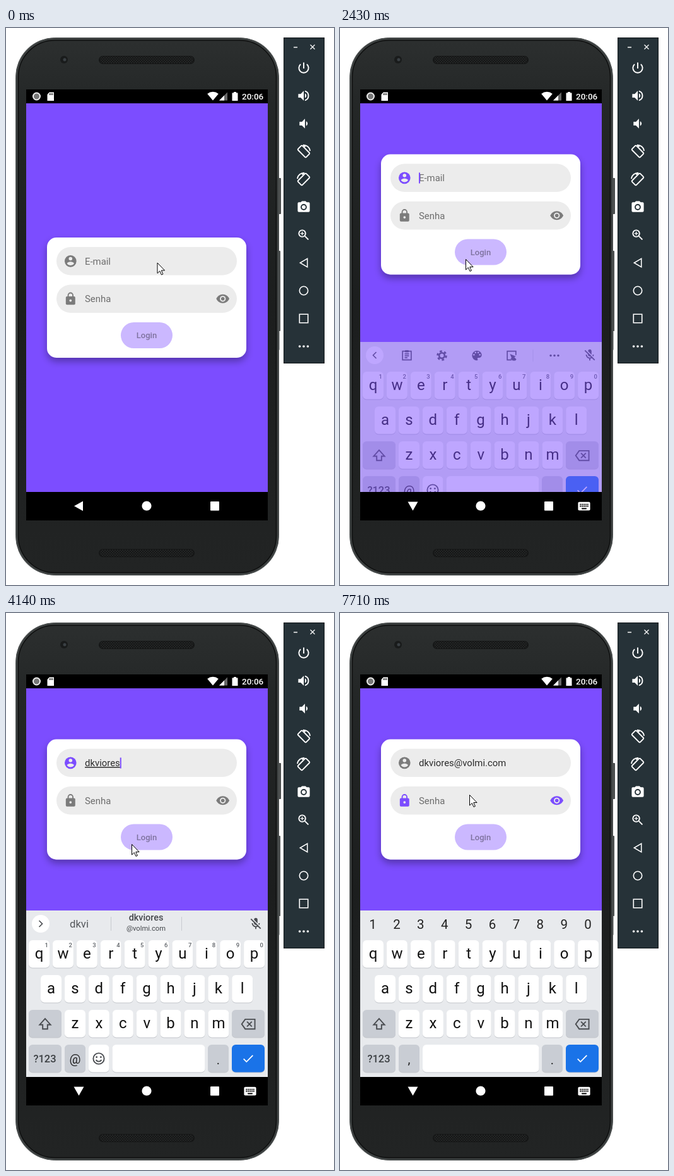
Write an HTML page that moves like this. It is 520 px wide and 880 px high and loops after 8000 ms.

```html
<!DOCTYPE html>
<html lang="pt">
<head>
<meta charset="utf-8">
<title>Login</title>
<style>
  html, body { margin: 0; width: 520px; height: 880px; overflow: hidden; background: #fff; }
  svg { display: block; }
  text { font-family: Roboto, sans-serif; white-space: pre; }
  .mid { text-anchor: middle; }
  .line { fill: none; stroke: currentColor; stroke-width: 2; }
  .icon { fill: currentColor; }
</style>
</head>
<body>
<svg id="stage" width="520" height="880" viewBox="0 0 520 880"></svg>
<script>
const USER = 'dkviores', HOST = '@volmi.com';
const LOOP = 8000, STEP = 1000 / 7;
const PURPLE = '#7c4dff', GRAY = '#7b7b7b', FIELD = '#ececec';

const rect = (x, y, w, h, r, fill, more = '') =>
  `<rect x="${x}" y="${y}" width="${w}" height="${h}" rx="${r}" fill="${fill}" ${more}/>`;
const circle = (x, y, r, more = '') => `<circle cx="${x}" cy="${y}" r="${r}" ${more}/>`;
const shape = (d, more = '') => `<path d="${d}" ${more}/>`;
const line = (d, more = '') => shape(d, `class="line" ${more}`);
const label = (x, y, size, str, fill, more = '') =>
  `<text x="${x}" y="${y}" font-size="${size}" fill="${fill}" ${more}>${str}</text>`;
const mid = (x, y, size, str, fill, more = '') => label(x, y, size, str, fill, `class="mid" ${more}`);
const icon = (x, y, size, color, body, id = '') =>
  `<g ${id && `id="${id}"`} class="icon" color="${color}" transform="translate(${x - size / 2} ${y - size / 2}) scale(${size / 24})">${body}</g>`;

// Icons on a 24 unit grid
const speaker = x => shape(`M${x} 9v6h4l5 5V4l-5 5z`) + shape(`M${x + 11} 8a4.5 4.5 0 0 1 0 8z`);
const turned = rect(7, 2.5, 10, 19, 1.5, 'none', 'class="line" transform="rotate(-45 12 12)"') +
  line('M11 1.5A11 11 0 0 1 22.5 11M11 1l3.5 3.5');
const dots = [5, 12, 19].map(x => circle(x, 12, 2)).join('');
const person = circle(12, 12, 10) + circle(12, 8, 3, `fill="${FIELD}"`) +
  shape('M6 16c0-2 4-3.1 6-3.1s6 1.1 6 3.1a7.2 7.2 0 0 1-12 0z', `fill="${FIELD}"`);
const lock = rect(4, 8, 16, 14, 2, 'currentColor') + line('M8 9V6a4 4 0 0 1 8 0v3') + circle(12, 15, 2, `fill="${FIELD}"`);
const eye = shape('M1 12C2.7 7.6 7 4.5 12 4.5S21.3 7.6 23 12c-1.7 4.4-6 7.5-11 7.5S2.7 16.4 1 12z') +
  circle(12, 12, 5, `fill="${FIELD}"`) + circle(12, 12, 3);
const clipboard = line('M4 4h16v16H4zM8 9h8M8 12.5h8M8 16h5') + rect(8.5, 2, 7, 4, 1, 'currentColor');
const gear = circle(12, 12, 5, 'class="line" style="stroke-width:3"') +
  circle(12, 12, 8, 'class="line" style="stroke-width:3.4" stroke-dasharray="4.19"');
const palette = shape('M12 3a9 9 0 0 0 0 18c2 0 1.9-1.7 1.2-2.5-.8-1 0-2.5 1.3-2.5H16c2.8 0 5-2.2 5-5 0-4.4-4-8-9-8z') +
  [[6.5, 10.5], [9.5, 6.5], [14.5, 6.5], [17.5, 10.5]].map(p => circle(...p, 1.5, 'fill="#e8eaed"')).join('');
const sticker = line('M20 11V4H4v16h8') + shape('M9 9l11 4.5-3 1.5 4 4-2 2.5h-5l-4-4 2-1z');
const micOff = rect(9, 2, 6, 12, 3, 'currentColor') + line('M6 11a6 6 0 0 0 12 0M12 17v4') +
  line('M5 2.5L22 19.5', 'style="stroke:#e8eaed"') + line('M3.6 3.6L20.4 20.4');
const erase = line('M7 4h16v16H7L1.3 12zM10 8l8 8M18 8l-8 8');
const keyboardIcon = rect(2, 5, 20, 14, 2, 'currentColor') +
  line('M5 9h14M5 12h14', 'style="stroke:#000" stroke-dasharray="2 1"') + line('M8 16h8', 'style="stroke:#000"');
const smiley = circle(12, 12, 9, 'class="line"') + circle(8.5, 9.5, 1.5) + circle(15.5, 9.5, 1.5) + line('M7.5 14a5 5 0 0 0 9 0');

function phone() {
  const grille = y => rect(147, y, 152, 13, 6.5, '#151616') + rect(149, y + 1, 148, 11, 5, 'url(#mesh)');
  return `<defs>
    <linearGradient id="shell" x2="0" y2="1"><stop stop-color="#2c2f2f"/><stop offset=".12" stop-color="#242727"/>
      <stop offset=".5" stop-color="#1c1e1e"/><stop offset="1" stop-color="#222424"/></linearGradient>
    <pattern id="mesh" width="4" height="4" patternUnits="userSpaceOnUse">${circle(1, 1, .8, 'fill="#343737"')}${circle(3, 3, .8, 'fill="#343737"')}</pattern>
    <filter id="shade" x="-20%" y="-20%" width="140%" height="150%"><feDropShadow dx="0" dy="6" stdDeviation="6" flood-opacity=".32"/></filter>
    <clipPath id="screen">${rect(32, 97, 383, 681, 0, '#000')}</clipPath></defs>` +
    rect(431, 237, 5, 57, 1, '#4a4d4d') + rect(431, 352, 4, 127, 1, '#4a4d4d') + rect(430, 479, 3.5, 30, 1, '#4a4d4d') +
    rect(15.5, 15.5, 417, 849, 62, '#3b3f3f', 'stroke="#555959"') +
    rect(19.5, 19.5, 409, 841, 58, 'url(#shell)', 'stroke="#0d0e0e" stroke-width="1.5"') +
    grille(44) + grille(823) + circle(92, 50, 6, 'fill="#191b1b"') + circle(93, 50, 2.5, 'fill="#3a4044"');
}

function sidebar() {
  const at = (row, body, size = 23) => icon(472, 63 + 44 * row, size, '#fff', body);
  return rect(440.5, 15.5, 64, 514, 0, '#263238', 'stroke="#101619"') +
    `<g color="#fff">${line('M456 30.5h6M482.5 26.5l7 7M489.5 26.5l-7 7', 'style="stroke-width:1.3"')}</g>` +
    at(0, line('M6.9 5.9a8 8 0 1 0 10.2 0M12 3v10')) +
    at(1, speaker(3) + line('M14 4.3a8 8 0 0 1 0 15.4')) +
    at(2, speaker(5)) +
    at(3, turned) + at(4, `<g transform="matrix(-1 0 0 1 24 0)">${turned}</g>`) +
    at(5, shape('M9 2L7.2 4H4a2 2 0 0 0-2 2v12a2 2 0 0 0 2 2h16a2 2 0 0 0 2-2V6a2 2 0 0 0-2-2h-3.2L15 2z') +
      circle(12, 12, 4.1, 'class="line" style="stroke:#263238"')) +
    at(6, circle(9.5, 9.5, 5.5, 'class="line"') + line('M14 14l5.7 5.7') +
      line('M6.5 9.5h6M9.5 6.5v6', 'style="stroke-width:1.4"')) +
    at(7, line('M18 5v14L6 12z', 'style="stroke-width:1.6"')) +
    at(8, circle(12, 12, 7, 'class="line" style="stroke-width:1.7"')) +
    at(9, line('M5 5h14v14H5z', 'style="stroke-width:1.7"')) + at(10, dots, 22);
}

function statusBar() {
  return rect(32, 97, 383, 22, 0, '#000') +
    circle(48.5, 108, 5.5, 'fill="#777" stroke="#eee" stroke-width="2"') +
    shape('M65.5 105l3.3-3.5h7.2v13.5H65.5z', 'fill="#fff"') +
    shape('M69.5 103v3M71.7 103v3M73.9 103v3', 'stroke="#000"') +
    shape('M328 114.5l-8.8-10.6a14 14 0 0 1 17.6 0z', 'fill="#fff"') +
    shape('M338 114.5h13v-13z', 'fill="#666"') + shape('M338 114.5h8v-8z', 'fill="#fff"') +
    shape('M358.5 102.5h2.5v-1.5h4v1.5h2.5V115h-9z', 'fill="#fff"') +
    label(374, 113, 13.5, '20:06', '#fff', 'font-weight="500"');
}

function card() {
  return `<g id="card">` + rect(65, 331, 316, 190, 15, '#fff', 'filter="url(#shade)"') +
    rect(80, 346, 286, 44.5, 22.2, FIELD) + rect(80, 405.5, 286, 44.5, 22.2, FIELD) +
    icon(102.3, 368.3, 22.4, GRAY, person, 'person') + icon(102.3, 427.8, 22.4, GRAY, lock, 'lock') +
    icon(343.7, 427.8, 22.4, GRAY, eye, 'eye') +
    label(125, 373.5, 14.9, 'E-mail', '#6d6d6d', 'id="email"') + label(125, 433, 14.9, 'Senha', '#6d6d6d') +
    rect(182, 465, 82, 41, 20.5, '#cbb8ff') + mid(223, 490, 13, 'Login', '#7e729e', 'font-weight="500"') +
    rect(0, 0, 2, 17, 0, PURPLE, 'id="caret"') + `</g>`;
}

const INK = '#4a4d51';
function keyboard() {
  const key = (x, y, w, fill) => rect(x, y + 1, w, 43.5, 6, '#c3c6cb') + rect(x, y, w, 43.5, 6, fill);
  const letters = (str, x, y) => [...str].map((c, i) =>
    key(x + 37.9 * i, y, 33, '#fff') + mid(x + 37.9 * i + 16.5, y + 29, 24, c, '#111')).join('');
  const digits = [...'1234567890'];
  const soft = '#c9cdd4';
  return `<g id="keyboard">` + rect(32, 470, 383, 264, 0, '#e8eaed') +
    letters('qwertyuiop', 36, 517) + letters('asdfghjkl', 55, 572) + letters('zxcvbnm', 93, 627) +
    key(36, 627, 52, soft) + icon(62, 649.5, 23, INK, line('M12 3L3 13h5v7h8v-7h5z')) +
    key(358, 627, 52, soft) + icon(384, 649.5, 23, INK, erase) +
    key(36, 682, 52, soft) + mid(61.5, 710, 16.5, '?123', '#3c4043', 'font-weight="500"') +
    key(93, 682, 33, soft) + key(320, 682, 33, soft) + mid(336.5, 713, 20, '.', '#222') +
    key(358, 682, 52, '#1a73e8') + icon(384, 704, 22, '#fff', line('M4 12.5l5 5L20 6.5')) +
    `<g id="plain">` + key(131, 682, 32.5, '#fff') + key(168.5, 682, 147, '#fff') +
    icon(147, 704, 23, INK, smiley) + mid(109.5, 712, 20, '@', '#222') +
    digits.map((d, i) => mid(64.2 + 37.9 * i, 528, 9.5, d, '#5f6368', 'font-weight="500"')).join('') +
    circle(55, 491, 14, 'fill="#fff"') + icon(55, 491, 20, INK, line('', 'id="chevron"')) +
    icon(396, 491, 22, INK, micOff) + `</g>` +
    `<g id="tools">` + [[106, clipboard], [161.5, gear], [217, palette], [272, sticker], [340, dots]]
      .map(([x, body]) => icon(x, 491.5, 20.5, INK, body)).join('') + shape('M306 482v19', 'stroke="#cfd2d6"') + `</g>` +
    `<g id="hints">` + rect(167, 470, 112, 41, 0, '#cccfd2', 'id="pressed"') +
    shape('M166.5 480v22M278.5 480v22', 'stroke="#c8cbd0"') + mid(116, 497, 16.7, '', '#54575b', 'id="word"') +
    mid(222, 486, 14.4, USER, '#44474b', 'font-weight="500"') + mid(222, 502, 11.2, HOST, '#44474b') + `</g>` +
    `<g id="secret">` + key(131, 682, 184.5, '#fff') + mid(109.5, 712, 20, ',', '#222') +
    digits.map((d, i) => mid(52 + 37.9 * i, 499, 20.5, d, '#222')).join('') + `</g></g>`;
}

function navBar() {
  return rect(32, 733, 383, 45, 0, '#000') + shape('', 'id="back" fill="#fff"') + circle(223, 755, 7.6, 'fill="#fff"') +
    rect(324, 748, 14, 14.5, 1, '#fff') + icon(387, 755.5, 23, '#fff', keyboardIcon, 'imeIcon');
}

const stage = document.getElementById('stage');
stage.innerHTML = phone() + sidebar() +
  `<g clip-path="url(#screen)">${rect(32, 97, 383, 681, 0, PURPLE)}${statusBar()}${card()}${keyboard()}${navBar()}</g>` +
  shape('M0 0v16.5l3.8-3.6 2.7 6 2.4-1.1-2.6-5.8h5.3z', 'id="pointer" fill="#fff" stroke="#000"');

const el = {};
stage.querySelectorAll('[id]').forEach(node => el[node.id] = node);
const set = (id, name, value) => el[id].setAttribute(name, value);
const show = (id, on) => set(id, 'visibility', on ? 'inherit' : 'hidden');

// Pointer stops: step, x, y
const PATH = [[0, 240, 371], [4, 193, 474], [6, 215, 498], [8, 242, 483], [10, 242, 483], [12, 195, 400], [14, 199.5, 365.5],
  [30, 199.5, 365.5], [35, 246, 484], [37, 250.5, 490.5], [39, 250.5, 490.5], [44, 214, 352], [45, 213.5, 346.5],
  [47, 213.5, 346.5], [49, 205.5, 287.5], [60, 205.5, 287.5]];

function pointerAt(k) {
  const i = PATH.findIndex(p => p[0] > k);
  const [k0, x0, y0] = PATH[i - 1], [k1, x1, y1] = PATH[i];
  const f = (k - k0) / (k1 - k0);
  return [x0 + (x1 - x0) * f, y0 + (y1 - y0) * f];
}

function draw(time) {
  const k = Math.floor((time + 5) / STEP);
  const focused = k >= 16, secret = k >= 50, typing = k >= 23 && k < 39;
  const hinting = k >= 25 && k < 39, filled = k >= 39;

  set('pointer', 'transform', `translate(${pointerAt(k)})`);
  set('card', 'transform', `translate(0 ${k >= 17 ? -131.5 : 0})`);
  set('person', 'color', focused && !secret ? PURPLE : GRAY);
  set('lock', 'color', secret ? PURPLE : GRAY);
  set('eye', 'color', secret ? PURPLE : GRAY);

  const typed = filled ? USER + HOST : typing ? USER.slice(0, k >= 29 ? 8 : k - 22) : '';
  el.email.textContent = typed || 'E-mail';
  set('email', 'fill', typed ? '#2b2b2b' : '#6d6d6d');
  set('email', 'text-decoration', typing ? 'underline' : 'none');
  const blinkOff = (k >= 33 && k < 39) || (k >= 42 && k < 45) || k >= 54;
  show('caret', focused && !blinkOff);
  set('caret', 'x', 125 + (typed && !secret ? el.email.getComputedTextLength() : 0));
  set('caret', 'y', secret ? 419.5 : 360);

  // The keyboard fades in while rising
  show('keyboard', k >= 17);
  set('keyboard', 'opacity', k === 17 ? .5 : k === 18 ? .95 : 1);
  set('keyboard', 'transform', `translate(0 ${k === 17 ? 26 : k === 18 ? 1 : 0})`);
  const numeric = k >= 51;
  show('plain', !numeric);
  show('secret', numeric);
  show('tools', !numeric && !hinting);
  show('hints', hinting);
  show('pressed', k >= 36 && hinting);
  el.word.textContent = USER.slice(0, k >= 30 ? 8 : k >= 27 ? 4 : 2);
  set('chevron', 'd', hinting ? 'M9 6l6 6-6 6' : 'M15 6l-6 6 6 6');

  set('back', 'd', focused ? 'M107.5 748.5h16l-8 14z' : 'M122 747.5v15.5l-14-7.8z');
  show('imeIcon', focused);
}

function tick(now) {
  draw(now % LOOP);
  requestAnimationFrame(tick);
}
requestAnimationFrame(tick);
</script>
</body>
</html>
```
